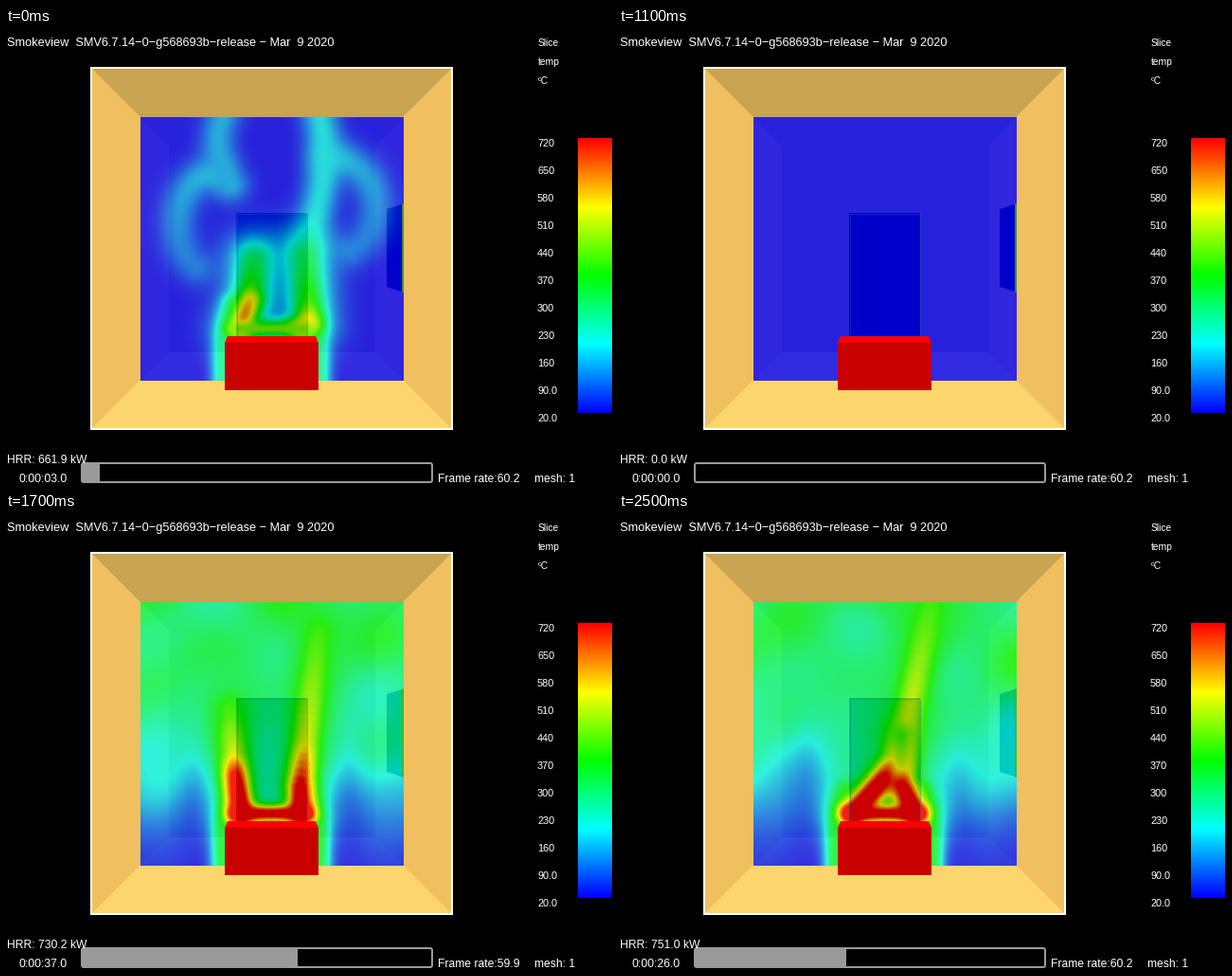
A matplotlib script that plays this animation: 641 by 482 pixels, repeating every 2.6 s.

```python
import numpy as np
import matplotlib
import matplotlib.pyplot as plt
from matplotlib.animation import FuncAnimation
from matplotlib.colors import LinearSegmentedColormap
from matplotlib.patches import FancyBboxPatch, Polygon, Rectangle

matplotlib.rcParams["font.family"] = "Liberation Sans"

W, H, PX = 641, 482, 0.72
X0, X1, Y0, Y1 = 142, 420, 94, 372
MID = 280
RAINBOW = LinearSegmentedColormap.from_list(
    "rainbow", ["#0000ff", "#00ffff", "#00ff00", "#ffff00", "#ff0000"], 512)
CEILING, SIDE, FLOOR = "#c8a350", "#f0c060", "#fcd66c"

gx, gy = np.meshgrid(np.arange(X0 + 1, X1, 2), np.arange(Y0 + 1, Y1, 2))

# Seconds, heat release, then the hot point and the tip of each flame arm
KEYS = np.array([
    # s   kW     left hot  left tip  right hot right tip
    [3, 661.9, 258, 285, 262, 245, 320, 310, 316, 240],
    [12, 709.4, 255, 262, 250, 205, 310, 292, 338, 250],
    [23, 736.8, 252, 290, 262, 250, 309, 294, 258, 155],
    [26, 751.0, 296, 262, 330, 94, 298, 285, 298, 235],
    [37, 730.2, 242, 275, 237, 208, 311, 288, 330, 125],
    [43, 751.5, 224, 262, 178, 172, 312, 250, 317, 215],
    [57, 753.1, 254, 295, 262, 245, 308, 306, 335, 190]])

rng = np.random.default_rng(4)
EDDIES = rng.uniform([0.02, 0.02, 0], [0.06, 0.06, 6.3], (8, 3))


def key(t, col):
    return np.interp(t, KEYS[:, 0], KEYS[:, col])


def brush(temp, x, y, value, radius, gain=1.0):
    """Pull the field softly towards the values along a curve."""
    x, y, value, radius = np.broadcast_arrays(x, y, value, radius)
    d2 = (gx[..., None] - x) ** 2 + (gy[..., None] - y) ** 2
    w = np.exp(-d2 / radius ** 2)
    near = w ** 6
    v = (near * value).sum(-1) / (near.sum(-1) + 1e-30)
    temp += gain * w.max(-1) * (v - temp)


def air(t):
    """Hot layer under the ceiling, cool draughts beside the fire, eddies."""
    hot = np.interp(t, [3, 12, 23], [0, 0.34, 0.41])
    level = np.interp(t, [12, 23], [268, 300])
    width = np.interp(t, [12, 23], [45, 30])
    draught = np.exp(-((abs(gx - MID) - 80) / 18) ** 2)
    level = level - 22 * draught + 7 * np.sin(gx / 19 + t)
    temp = hot * (1 - 0.25 * (gy - Y0) / (Y1 - Y0)) / (1 + np.exp((gy - level) / width))
    swirl = sum(np.sin(a * gx + p + 0.7 * t) * np.sin(b * gy + 2 * p - t)
                for a, b, p in EDDIES)
    return temp * (1 + 0.06 * swirl)


def first_plumes(temp, t):
    """Early smoke: two columns that curl outward below the ceiling."""
    gain = np.interp(t, [0, 3, 9], [0, 1, 0])
    s = np.linspace(0, 1, 30)
    a = np.radians(-90 + 150 * s)
    for side in (-1, 1):
        brush(temp, MID + side * (62 + (42 + 6 * side) * np.cos(a)),
              198 - 9 * side + 52 * np.sin(a), 0.19 - 0.08 * s, 20, gain)
        foot = 190 + 25 * side
        brush(temp, MID + side * (42 + 14 * np.sin(2.4 * s)), foot + (Y0 - foot) * s,
              0.2 + 0.03 * side, 19, gain)


def temperature(t):
    temp = air(t)
    if t < 9:
        first_plumes(temp, t)
    power = np.interp(t, [0, 3, 12], [0, 0.75, 1])
    lit = min(1, t / 3)
    s = np.linspace(0, 1, 41)
    arms = []
    for base, col in ((248, 2), (312, 6)):
        x = np.interp(s, [0, 0.5, 1], [base, key(t, col), key(t, col + 2)])
        y = np.interp(s, [0, 0.5, 1], [316, key(t, col + 1), key(t, col + 3)])
        arms.append((x, y))
        brush(temp, x, y, 0.45 * power, 31, 0.8 * lit)
    for side in (-1, 1):
        brush(temp, MID + side * (52 - 10 * s ** 3), Y1 - 80 * s, 0.45 * power, 11, lit)
    for x, y in arms:
        value = np.interp(s, [0, 0.5, 0.65, 1], [1.25, 1.05, 0.72, 0.53])
        brush(temp, x, y, value * power, 13 + 3 * s, lit)
    brush(temp, np.linspace(242, 318, 30), 317, 1.1 * power ** 2, 9, lit)
    return temp


fig = plt.figure(figsize=(W / 100, H / 100), dpi=100, facecolor="black")
ax = fig.add_axes([0, 0, 1, 1])
ax.axis("off")


def label(x, y, s, size=12.1):
    return ax.text(x, y, s, color="white", size=size * PX, va="baseline", zorder=9)


def poly(color, *pts, **kw):
    ax.add_patch(Polygon(pts, fc=color, lw=0, **kw))


def box(x0, y0, x1, y1, color, z, **kw):
    ax.add_patch(Rectangle((x0, y0), x1 - x0, y1 - y0,
                           **{"fc": color, "lw": 0, "zorder": z, **kw}))


def room(x0, y0, x1, y1, d):
    """Four walls running inward by d from the given rectangle."""
    u0, v0, u1, v1 = x0 + d, y0 + d, x1 - d, y1 - d
    box(x0, y0, x1, y1, SIDE, 1)
    poly(CEILING, (x0, y0), (x1, y0), (u1, v0), (u0, v0), zorder=1)
    poly(FLOOR, (x0, y1), (x1, y1), (u1, v1), (u0, v1), zorder=1)


# Room, openings and the translucent temperature slice
room(90, 42, 471, 423, 52)
room(X0, Y0, X1, Y1, 30)
box(172, 124, 390, 342, CEILING, 1)
box(243, 195, 318, 325, "black", 2)
poly("black", (402, 191), (418, 186), (418, 278), (402, 273), zorder=2)
field = ax.imshow(gx * 0.0, cmap=RAINBOW, vmin=0, vmax=1, alpha=0.8, aspect="auto",
                  extent=(X0, X1, Y1, Y0), interpolation="bilinear", zorder=3)
ax.plot([418.5, 418.5], [186, 278], color="#30b010", lw=1.5 * PX, zorder=4)
box(243.5, 195.5, 317.5, 325.5, "none", 4, ec="#106c90", lw=PX, alpha=0.4)
box(90, 42, 471, 423, "none", 5, ec="white", lw=2 * PX)

# Burner
poly("#ff0000", (231, 332), (234, 325), (327, 325), (330, 332), zorder=5)
box(231, 332, 330, 381.5, "#c80000", 5)

# Colour scale
ax.imshow(np.linspace(1, 0, 290)[:, None], cmap=RAINBOW, vmin=0, vmax=1,
          extent=(604, 640, 406, 116), aspect="auto", zorder=3)
for i in range(11):
    v = 720 - 70 * i
    label(561, 125 + 29 * i, f"{v}" if v > 99 else f"{v:.1f}", 10.9)
for i, s in enumerate(["Slice", "temp", "\u00baC"]):
    label(562, 19 + 20 * i, s, 10.2)

# Status texts and time bar
label(1, 19, "Smokeview  SMV6.7.14\u22120\u2212g568693b\u2212release \u2212 Mar  9 2020", 12.7)
label(558, 479, "mesh: 1")
power_text = label(1, 459, "")
clock = label(13, 479, "")
rate = label(456, 479, "")
bar = ax.add_patch(Rectangle((80, 459), 0, 20, fc="#9a9a9a", lw=0, zorder=6))
ax.add_patch(FancyBboxPatch((80, 459), 370, 20, boxstyle="round,pad=0,rounding_size=2",
                            fc="none", ec="#9a9a9a", lw=2 * PX, zorder=7))
ax.set_xlim(0, W)
ax.set_ylim(H, 0)


def update(i):
    step = max(i - 1, 0)
    t = np.interp(step, [0, 3, 7, 12, 16, 19, 24], [3, 23, 43, 72, 97, 117, 146])
    t = int(round(t)) % 60
    field.set_data(temperature(t))
    power_text.set_text(f"HRR: {min(1, t / 3) * key(t, 1):.1f} kW")
    clock.set_text(f"0:00:{t:02d}.0")
    rate.set_text("Frame rate:" + ("59.9" if step % 13 % 5 == 3 else "60.2"))
    bar.set_width(370 * t / 60)
    return field, power_text, clock, rate, bar


anim = FuncAnimation(fig, update, frames=26, interval=100, repeat=True, repeat_delay=0)
plt.show()
```
